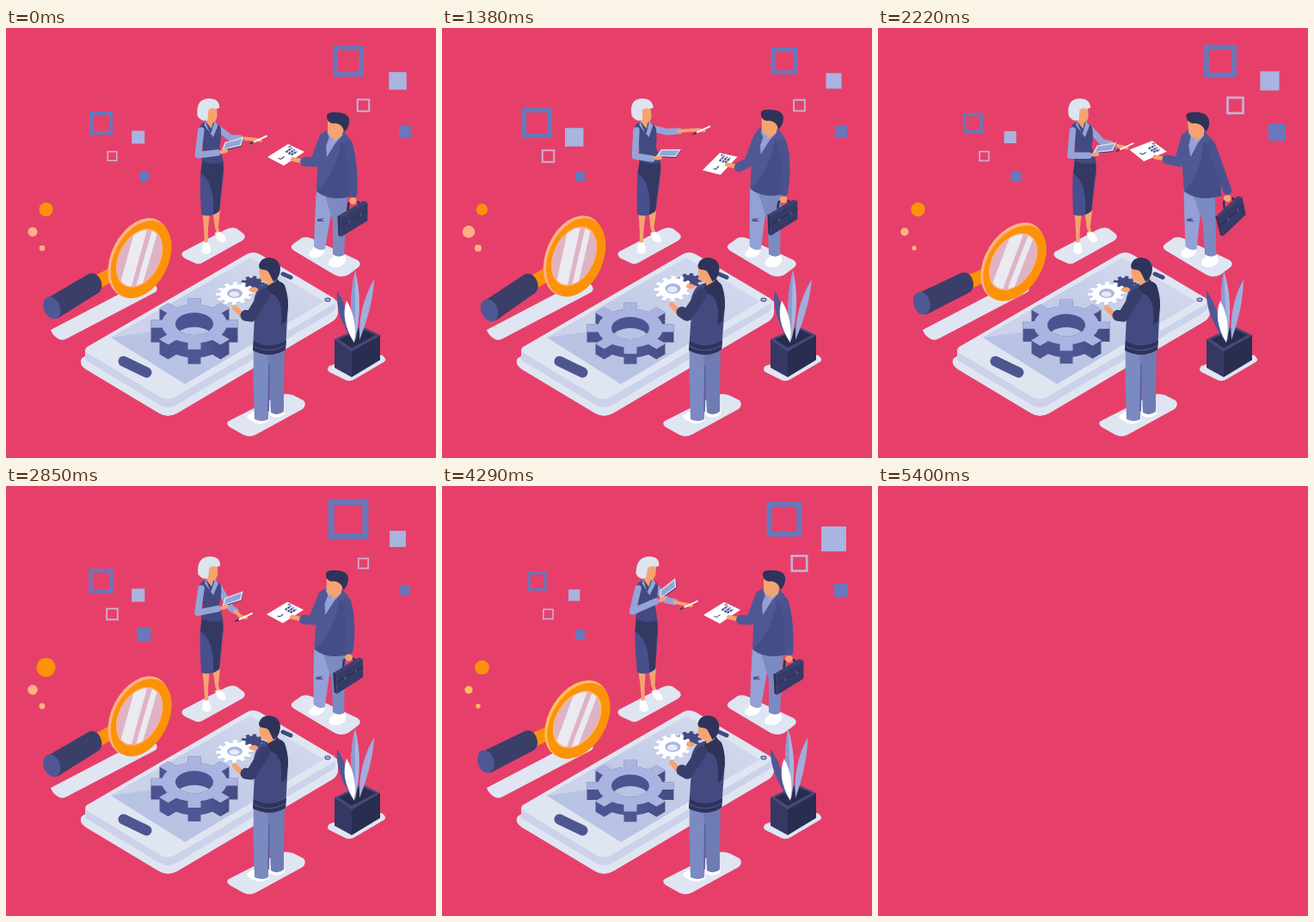
An HTML page for the animation above (5.43 s loop, 500 by 500 pixels).

```html
<!DOCTYPE html>
<html lang="en">
<head>
<meta charset="utf-8">
<title>Isometric teamwork</title>
<style>
html, body { margin: 0; width: 100%; height: 100%; overflow: hidden; background: #e6406a; }
svg { display: block; width: 100%; height: 100%; }
.pad { fill: #e0e5f2; }
.white { fill: #fff; }
.skin { fill: #f5a470; }
.navy { fill: #2f335a; }
.dark { fill: #434a80; }
.blue { fill: #4f5894; }
.jean { fill: #7c8ac2; }
.pale { fill: #a9b5e0; }
.amber { fill: #fc9208; }
.limb { fill: none; stroke-linecap: round; stroke-linejoin: round; }
</style>
</head>
<body>
<svg viewBox="0 0 500 500">
<defs>
  <linearGradient id="screenFill" x1="0" y1="1" x2="1" y2="0">
    <stop offset=".25" stop-color="#b8c2e3"/><stop offset=".8" stop-color="#d0d7ec"/>
  </linearGradient>
  <linearGradient id="sideFill">
    <stop offset="0" stop-color="#4b5390"/><stop offset=".55" stop-color="#4f5894"/><stop offset="1" stop-color="#444b82"/>
  </linearGradient>
  <clipPath id="holeClip"><ellipse id="holeEdge" cx="219" rx="22" ry="13"/></clipPath>
  <clipPath id="lensClip"><ellipse cx="155" cy="267.5" rx="23" ry="35" transform="rotate(28 155 267.5)"/></clipPath>
</defs>
<g id="scene">
  <g id="shapes"></g>

  <g class="pad">
    <path d="M206 260Q202 264 208 268L219 273Q224 276 230 272L275 247Q280 243 276 239L268 233Q262 231 256 234Z"/>
    <path d="M334 251L344 244Q350 242 356 245L409 270Q414 274 410 278L398 287Q390 291 382 287L335 259Q329 255 334 251Z"/>
    <path d="M52 351Q54 358 62 362Q66 364 71 361L174 307Q178 304 173 298L163 293Z"/>
    <path d="M376 393L424 377L438 381Q443 385 440 388L406 408Q400 412 394 409L376 400Q372 397 376 393Z"/>
    <path d="M259 457L318 427Q326 424 334 427L346 433Q350 438 345 443L292 472Q284 477 276 473L260 464Q255 460 259 457Z"/>
    <path d="M88 384Q84 391 93 397L178 448Q188 454 199 448L380 341Q387 336 386 328V318L287 265Z"/>
  </g>

  <!-- phone -->
  <path fill="#cbd2ea" d="M92 374V386L180 439Q188 443 197 439L378 331Q383 328 383 325V317L287 300Z"/>
  <path fill="#e0e5f2" d="M94 371L280 263Q287 259 295 263L381 314Q386 318 381 321L197 429Q188 434 179 429L95 378Q90 375 94 371Z"/>
  <path fill="url(#screenFill)" d="M122 360L284 267L370 318L208 414Z"/>
  <path fill="#cbd2e9" d="M122 360L180 327L178 352Z"/>
  <path class="limb" stroke="#4e5690" stroke-width="12" d="M136.500 387.500L163.500 400.500"/>
  <path class="limb" stroke="#434a80" stroke-width="5" d="M322 286L331 290"/>
  <ellipse cx="374" cy="316" rx="3" ry="1.800" fill="#a9b5e0" stroke="#4e5690" stroke-width="1.200"/>

  <!-- large gear -->
  <path id="gearSide" fill="url(#sideFill)"/>
  <path id="gearTop" class="pale"/>
  <ellipse id="gearHole" cx="219" rx="22" ry="13" fill="#4b5390"/>
  <g clip-path="url(#holeClip)"><ellipse id="gearFloor" cx="219" rx="22" ry="13" fill="#b8c2e3"/></g>

  <!-- magnifier -->
  <g id="glass">
    <path class="amber" d="M100 290L122 278L129 292L104 306Z"/>
    <path fill="#3a3e68" d="M47 315L96 286Q104 283 109 291Q114 300 109 307L60 338Z"/>
    <ellipse cx="53.500" cy="325.500" rx="9.500" ry="13.500" transform="rotate(-22 53.500 325.500)" fill="#4f5894"/>
    <ellipse class="rim" cx="154.500" cy="267" rx="32" ry="49" transform="rotate(26.500 154.500 267)"/>
    <ellipse class="amber" cx="157" cy="269" rx="31.500" ry="48" transform="rotate(26.500 157 269)"/>
    <ellipse class="rim" cx="155" cy="267.500" rx="24" ry="36.500" transform="rotate(28 155 267.500)"/>
    <g clip-path="url(#lensClip)">
      <path fill="#dfb3c4" d="M120 225H195V310H120Z"/>
      <path fill="#ebe9f1" d="M151 230H165L146 300H132ZM171 230H178L157 304H150Z"/>
    </g>
  </g>

  <!-- plant -->
  <path fill="#434a7c" d="M382 362L414 347L435 357L402 376Z"/>
  <path fill="#282c4e" d="M387 362L414 350L430 357L402 372Z"/>
  <path id="leafL" class="blue"/><path id="leafM" class="pale"/><path id="leafM2" fill="#8c9ad2"/>
  <path id="leafR" fill="#a0addd"/><path id="leafW" class="white"/>
  <path fill="#343862" d="M382 362L402 376V406L382 395Z"/>
  <path fill="#292d50" d="M402 376L435 357V386L402 406Z"/>

  <!-- woman -->
  <g id="womanLow">
    <path class="skin" d="M228 212H237L235 235V255H231Q231 235 228 212ZM240 212H249L247 232L251 244L247 245L243 232Z"/>
    <path class="white" d="M229 250L235 249Q239 255 238 261Q233 265 228 260ZM243 238L249 237Q256 242 256 248Q250 251 246 246Z"/>
    <path fill="#484f8d" d="M228 152H251Q254 162 252 176Q250 198 248 213Q239 221 227 217Q225 185 226 168Z"/>
    <path fill="#343963" d="M228 152L251 150Q254 162 251 176Q249 198 248 213L241 217Q243 180 226 169Z"/>
  </g>
  <path id="armBack" class="limb" stroke="#93a4d8" stroke-width="7.500"/>
  <path id="armFore" class="limb" stroke="#f5a470" stroke-width="4"/>
  <path id="pen" class="limb" stroke="#fff" stroke-width="1.800"/>
  <path id="penTip" class="limb" stroke="#343963" stroke-width="1.800"/>
  <g id="womanUp">
    <path class="dark" d="M225 115Q230 108 238 108Q247 109 250 116Q251 128 248 138Q251 146 252 156Q240 161 227 154L229 138Q223 128 225 115Z"/>
    <path fill="#93a4d8" d="M232 108L238 124L243 108L247 113L241 127L231 113Z"/>
    <path class="skin" d="M233 92H246V103Q244 110 241 110L239 117L233 109Z"/>
    <path fill="#dce5ef" d="M223 96Q224 82 237 82Q249 82 249 93L244 94Q238 92 236 96L235 107Q228 110 223 102Z"/>
  </g>
  <path id="armTab" class="limb" stroke="#93a4d8" stroke-width="7.500"/>
  <g id="tablet">
    <path fill="#343963" d="M0 1L6 -7L29 -7L23 2Z"/>
    <path fill="#d7def0" d="M0 0L6 -8L29 -8L23 1Z"/>
    <path fill="#93a4d8" d="M3 -1L7 -6.500L26 -6.500L22 -.5Z"/>
    <ellipse class="skin" cx="2" cy="2" rx="5" ry="2.500"/>
  </g>

  <!-- man with briefcase -->
  <g id="manLow">
    <path class="white" d="M358 251L370 255Q373 262 364 266Q355 269 352 264Q352 260 357 257ZM381 260L393 263Q398 271 391 276Q381 281 375 275Q375 269 381 266Z"/>
    <path fill="#93a1d6" d="M361 186L382 190L377 222L371 257Q364 260 358 254Q359 220 361 186Z"/>
    <path class="jean" d="M370 190H397Q395 230 393 264Q386 268 380 263V225Z"/>
    <path fill="#4f5894" d="M362 222L370 221L367 223L371 225H362Z"/>
  </g>
  <g id="paper">
    <path class="white" d="M-21.500 2.500L2.500 -12.500L21.500 -3.500L-2.500 12.500Z"/>
    <path d="M0 -3L7 -8M3 -1L10 -6M6 0L13 -4" stroke="#4f5894" stroke-width="2.200" stroke-dasharray="3 .7"/>
    <path d="M-9 4L-6 5L-2 2M3 -9L6 -10" fill="none" stroke="#343963"/>
  </g>
  <path id="handGive" class="limb" stroke="#f5a470" stroke-width="5"/>
  <g id="case">
    <path d="M-6 -9L-5 -17Q1 -22 7 -18L8 -14" fill="none" stroke="#2f335a" stroke-width="2.500"/>
    <path fill="#3c426f" d="M-18 -2L12 -20L17 -18L-14 1Z"/>
    <path class="navy" d="M-18 -3L-14 0V22L-17 20Z"/>
    <path fill="#353a66" d="M-14 0L17 -18V3L-14 22Z"/>
    <path d="M-14 9L17 -9" stroke="#292d50"/>
    <path fill="#4f5894" d="M-5 3L-3 2V5L-5 6ZM8 -5L10 -6V-3L8 -2Z"/>
  </g>
  <g id="manUp">
    <path class="blue" d="M374 119Q365 120 363 144L361 189Q376 203 404 195L406 150Q404 130 393 121Z"/>
    <path fill="#454d87" d="M390 132Q383 170 363 188L361 190Q378 203 404 195L406 148Z"/>
    <path fill="#93a1d6" d="M374 119L372 134L373 150L383 134L391 125Z"/>
    <path class="skin" d="M374 108V119Q375 128 382 128L379 133L391 125L394 108Z"/>
    <path class="navy" d="M373 104Q372 98 380 98Q397 97 399 106Q400 114 394 121L391 115Q386 110 380 111Q374 110 373 104Z"/>
  </g>
  <path id="armGive" class="limb" stroke="#4f5894" stroke-width="11"/>
  <path id="armCase" class="limb" stroke="#4a528e" stroke-width="10"/>
  <ellipse id="handCase" class="skin" rx="4.500" ry="4"/>

  <!-- man with gears -->
  <path id="cogBack" class="dark"/>
  <path id="cogSide" fill="#c2cae8"/>
  <path id="cog" class="white"/>
  <ellipse id="cogRing" class="pale" rx="9"/>
  <ellipse id="cogHole" fill="#e6eaf5" rx="6"/>
  <path class="white" d="M287 446H305L306 456Q298 462 290 459Q280 455 280 451ZM307 441H323L324 449Q315 456 306 450Z"/>
  <path class="jean" d="M288 372H310Q305 415 305 455Q298 459 289 455Q287 412 288 372Z"/>
  <path fill="#6f7cb4" d="M303 372L324 370Q323 410 323 446Q316 452 308 447L306 400Z"/>
  <path d="M306 392L305 446" stroke="#555f9c" stroke-width="1.500"/>
  <g id="coderUp">
    <path class="dark" d="M294 302Q304 293 320 296Q328 306 328 322L325 374Q308 385 287 375L289 335Q285 315 294 302Z"/>
    <path class="navy" d="M305 296Q318 291 324 299Q328 310 328 324L325 342L320 345Q322 320 314 312L303 306Z"/>
    <path class="navy" d="M288 364Q306 375 326 363L325 374Q308 385 287 375Z"/>
    <path d="M288 370Q307 380 325 369" fill="none" stroke="#4f5894"/>
  </g>
  <g id="coderHead">
    <path class="skin" d="M294 277L295 289Q296 296 303 295L304 300L314 294V277Z"/>
    <path class="navy" d="M294 276Q296 267 306 267Q319 268 319 281Q318 291 311 295L307 287Q305 281 299 281Q294 281 294 276Z"/>
    <path class="navy" d="M303 299Q311 301 315 291L321 299L306 307Z"/>
  </g>
  <ellipse id="coderPalm" class="skin" rx="5" ry="3"/>
  <path id="coderHand" class="limb" stroke="#f5a470" stroke-width="6"/>
  <path id="coderArm" class="limb" stroke="#383d6c" stroke-width="13"/>
</g>
</svg>
<script>
const LOOP = 5430, STEP = 30, CUT = 5400, QUICK = 1800, SLOW = 2160;
const $ = id => document.getElementById(id);
const set = (id, attrs) => { for (const k in attrs) $(id).setAttribute(k, attrs[k]); };
const mix = (a, b, u) => a + (b - a) * u;

// wave: 1 at its peak, -1 half a period later; bump: one soft rise to 1
const wave = (t, peak, period) => Math.cos(2 * Math.PI * (t - peak) / period);
const bump = (t, peak, width) => Math.exp(-(((t - peak) / width) ** 2));
// Damped spring that restarts on every beat after its onset
function spring(t, onset, beat) {
  if (t < onset) return 0;
  const x = (t - onset) % beat;
  return .65 * Math.exp(-x / 644) * Math.sin(Math.PI * x / 590);
}

// kind, centre, rest size, onset, beat
const SHAPES = [
  ['chip', 464, 121, 14, 185, QUICK],
  ['thin', 415.5, 90, 15.5, 290, QUICK],
  ['tile', 455.5, 61.5, 20.5, 395, QUICK],
  ['frame', 398, 38.5, 36, 650, QUICK],
  ['chip', 160.5, 172.5, 11, 800, QUICK],
  ['thin', 123.5, 149, 12, 980, QUICK],
  ['tile', 153.7, 127, 15, 1140, SLOW],
  ['frame', 110.5, 110.5, 27, 1270, SLOW],
  ['ball', 46.5, 211, 16, 540, SLOW],
  ['dot', 31, 237, 11, 1270, SLOW],
  ['dot', 42, 256, 6.5, 1290, SLOW]
];
const square = (side, paint) =>
  `<rect x="${-side / 2}" y="${-side / 2}" width="${side}" height="${side}" ${paint}/>`;
const outline = (w, color) => square(1 - w, `fill="none" stroke="${color}" stroke-width="${w}"`);
const STYLE = {
  frame: outline(.15, '#6878bb'),
  thin: outline(.13, '#c9b0d6'),
  tile: square(1, 'fill="#a9b4e0"'),
  chip: square(1, 'fill="#6878bb"'),
  ball: '<circle r=".5" class="amber"/>',
  dot: '<circle r=".5" class="rim"/>'
};
$('shapes').innerHTML = SHAPES.map(s => `<g>${STYLE[s[0]]}</g>`).join('');

function gear(cx, cy, R, r, n, k, half, turn = 0, tilt = 0) {
  const pts = [], c = Math.cos(tilt), s = Math.sin(tilt);
  const add = (rad, a) => {
    const x = rad * Math.cos(a), y = k * rad * Math.sin(a);
    pts.push(`${(cx + x * c - y * s).toFixed(2)} ${(cy + x * s + y * c).toFixed(2)}`);
  };
  for (let i = 0; i < n; i++) {
    const a = turn + i * 2 * Math.PI / n, o = half / R, q = half / r, gap = 2 * Math.PI / n - 2 * q;
    add(r, a - q); add(R, a - o); add(R, a + o); add(r, a + q);
    add(r, a + q + gap / 3); add(r, a + q + gap * 2 / 3);
  }
  return `M${pts.join('L')}Z`;
}
function leaf(x, y, tx, ty, left, right) {
  const mx = mix(x, tx, .55), my = mix(y, ty, .55);
  return `M${x} ${y}Q${mx - left} ${my} ${tx} ${ty}Q${mx + right} ${my} ${x} ${y}Z`;
}
// Horizontal lean that shifts by a at height ya and by b at height yb
function lean(a, ya, b, yb, rise = 0) {
  const k = (a - b) / (ya - yb), c = a - k * ya;
  return { at: y => c + k * y, matrix: `matrix(1 0 ${k} 1 ${c} ${-rise})` };
}

function drawShapes(t) {
  SHAPES.forEach(([, x, y, rest, onset, beat], i) => {
    const size = rest * (1 + spring(t, onset, beat));
    $('shapes').children[i].setAttribute('transform', `translate(${x} ${y}) scale(${size})`);
  });
  const rim = t < 3300 ? '#fdb184' : '#fdbf5e';
  document.querySelectorAll('.rim').forEach(el => el.setAttribute('fill', rim));
}

function drawGear(t) {
  const h = 14.5 + 2.5 * wave(t, 0, 2700), y = 361 - h;
  const at = cy => gear(219, cy, 51, 38, 8, .59, 7.5);
  let side = '';
  for (let d = 0; d <= h; d++) side += at(y + d);
  set('gearSide', { d: side });
  set('gearTop', { d: at(y) });
  set('holeEdge', { cy: y });
  set('gearHole', { cy: y });
  set('gearFloor', { cy: y + h * .75 + 4 });
}

// The magnifier and the leaves share one breeze
function drawSway(t) {
  const s = .5 + .52 * wave(t, 530, QUICK);
  set('glass', { transform: `rotate(${(s - .33) * 8.2} 110 294)` });
  const m = 408 - 6 * s;
  set('leafL', { d: leaf(404, 365, 387 - 5 * s, 305, 12, 7) });
  set('leafM', { d: leaf(406, 364, m, 282, 9, 10) });
  set('leafM2', { d: leaf(406, 364, m, 282, 9, 0) });
  set('leafR', { d: leaf(411, 363, 430 - 5 * s, 292, 11, 6) });
  set('leafW', { d: leaf(405, 366, 395 + 3 * s, 317, 12, 9) });
}

function drawWoman(t) {
  const reach = wave(t, 3250, 4600), poise = wave(t, 1300, 6000);
  const hip = 2 * poise, up = lean(-3 * poise, 96, hip, 155);
  set('womanUp', { transform: up.matrix });
  set('womanLow', { transform: lean(hip, 155, 0, 217).matrix });
  const x = 290 - 15 * reach, y = 135 + 20 * reach, ex = 261, ey = 118 + (y - 114) * .62;
  const wx = mix(ex, x, .35), wy = mix(ey, y, .35);
  set('armBack', { d: `M${247 + up.at(117)} 117L${ex} ${ey}L${wx} ${wy}` });
  set('armFore', { d: `M${wx} ${wy}L${x - 4} ${y}l6 1` });
  set('pen', { d: `M${x - 6} ${y + 3}l15 -7` });
  set('penTip', { d: `M${x - 10} ${y + 5}l3 -1.500` });
  const a = 19 - 19 * poise, tx = 249 + .12 * a, ty = 149 - .47 * a;
  set('tablet', { transform: `translate(${tx} ${ty}) rotate(${-a})` });
  set('armTab', { d: `M${227 + up.at(119)} 119L${223 + up.at(149)} ${149 - a * .08}L${tx - 5} ${ty + 3}` });
}

function drawMan(t) {
  const ready = bump(t, 1380, 400), give = bump(t, 2220, 400), shift = bump(t, 2100, 900);
  const hip = -5 * shift, up = lean(-14 * give - 2 * ready, 108, hip, 193, 3 * ready);
  set('manUp', { transform: up.matrix });
  set('manLow', { transform: lean(hip, 193, 0, 262).matrix });
  const px = 325.5 - 11.5 * give - 2 * ready, py = 147.5 + 10.5 * ready - 4.5 * give;
  const hx = px + 13, hy = py + 6 - (py - 147.5) * .4;
  set('paper', { transform: `translate(${px} ${py}) rotate(${11 * give - 13 * ready})` });
  set('handGive', { d: `M${hx - 5} ${hy - 1}L${hx + 4} ${hy + 1}` });
  set('armGive', { d: `M${370 + up.at(127)} 127L${359 + up.at(155)} 156L${hx + 9} ${hy + 2}` });
  const cx = 17 * give - 14 * shift, cy = -3 * shift;
  set('case', { transform: `translate(${403.5 + cx} ${221 + cy}) rotate(${-12 * give} 0 -18)` });
  set('armCase', { d: `M${398 + up.at(135)} 135Q${405 + up.at(160)} 160 ${403.5 + cx * .85} ${192 + cy}` });
  set('handCase', { cx: 403.5 + cx * .9, cy: 201 + cy });
}

function drawCoder(t) {
  const lift = bump(t, 1380, 350) + bump(t, 4290, 300) - bump(t, 3720, 300);
  const x = 266 + 2.5 * lift, y = 308.5 - 5.5 * lift, k = .6 + .07 * lift, head = 3.5 * lift, dy = y - 308;
  const cog = cy => gear(x, cy, 22, 17, 12, k, 2.4, .1, -.12);
  set('cogBack', { d: gear(287 + lift, 297 + dy * .6, 14, 10.5, 9, .65, 2.2) });
  set('cogSide', { d: cog(y + 2) });
  set('cog', { d: cog(y) });
  set('cogRing', { cx: x, cy: y, ry: 9 * k });
  set('cogHole', { cx: x - .5, cy: y + 1, ry: 5.5 * k });
  set('coderHead', { transform: `translate(${head} 0)` });
  set('coderUp', { transform: lean(head * .4, 300, 0, 375).matrix });
  const hy = 329 + dy * .7;
  set('coderPalm', { cx: 288 + lift, cy: 304 + dy * .7 });
  set('coderHand', { d: `M${266 + lift} ${hy - 4}L274 ${hy + 4}` });
  set('coderArm', { d: `M${301 + head * .4} 309L285 ${335 + dy * .15}L279 ${hy + 5}` });
}

const PARTS = [drawShapes, drawGear, drawSway, drawWoman, drawMan, drawCoder];
function tick() {
  const t = Math.floor(performance.now() % LOOP / STEP) * STEP;
  $('scene').style.display = t < CUT ? '' : 'none';
  if (t < CUT) PARTS.forEach(part => part(t));
  requestAnimationFrame(tick);
}
tick();
</script>
</body>
</html>
```
